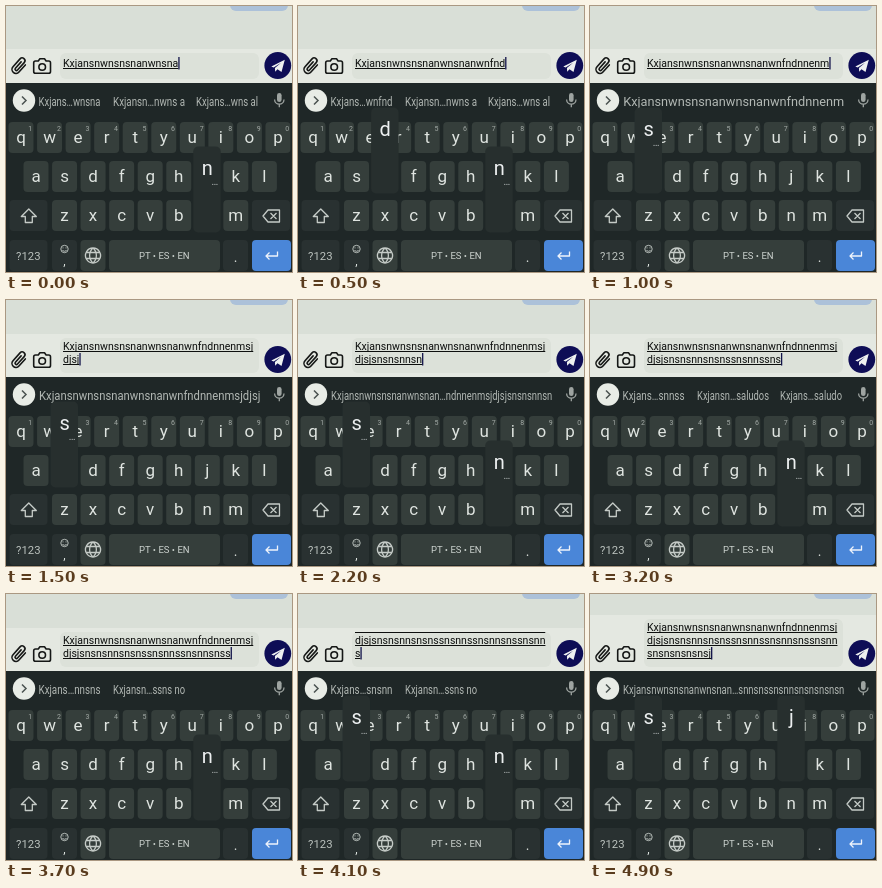
An HTML page that plays this animation: 286x266 px, repeating every 5000 ms.

```html
<!DOCTYPE html>
<html lang="en">
<head>
<meta charset="utf-8">
<title>Typing on a phone keyboard</title>
<style>
  html, body { margin: 0; width: 100%; height: 100%; overflow: hidden; background: #d9dfd7; }
  svg { display: block; width: 286px; height: 266px; font-family: Roboto, "Liberation Sans", sans-serif; }
</style>
</head>
<body>
<svg id="stage" viewBox="0 0 286 266" xmlns="http://www.w3.org/2000/svg">
  <defs><clipPath id="field"><rect id="fieldBox" x="50" width="205" height="70"/></clipPath></defs>
  <rect width="286" height="80" fill="#d9dfd7"/>
  <rect x="224" y="-12" width="58" height="17" rx="6" fill="#acc1d9"/>
  <rect id="panel" width="286" fill="#e4e8e1"/>
  <rect id="inputBox" x="54" width="199" rx="6" fill="#dce1d9"/>

  <g fill="none" stroke="#151716" stroke-width="1.6" stroke-linecap="round" stroke-linejoin="round">
    <path transform="translate(13 60) rotate(42)" d="M4-5V4.5a4 4 0 0 1-8 0V-6a2.8 2.8 0 0 1 5.6 0V4a1.4 1.4 0 0 1-2.8 0V-4.5"/>
    <path d="M29.5 55h2.8l1.6-2.2h4.6l1.6 2.2h2.6q1.8 0 1.8 1.8v8.6q0 1.8-1.8 1.8H29.5q-1.8 0-1.8-1.8v-8.6q0-1.8 1.8-1.8z"/>
    <circle cx="36.2" cy="61" r="3.3"/>
  </g>
  <circle cx="271.8" cy="59.5" r="13.4" fill="#0e0d56"/>
  <path d="M265.3 60.5l13.5-6.7-3.3 12.2-4-2.7-2.3 2.5-.3-3.9 6.2-5.1-7.5 4.8z" fill="#eef0f0"/>

  <g clip-path="url(#field)">
    <g id="typed" font-size="10.5" fill="#0d0f0e"></g>
    <rect id="caret" width="1.3" height="12.5" fill="#12134a"/>
  </g>

  <rect y="77" width="286" height="189" fill="#1f2727"/>
  <circle cx="18" cy="94.5" r="11.2" fill="#e8ece6"/>
  <path d="M16 90.5l4 4-4 4" fill="none" stroke="#4a5250" stroke-width="1.5"/>
  <g fill="none" stroke="#9ea4a1" stroke-width="1.3">
    <rect x="271" y="87" width="4.6" height="9" rx="2.3" fill="#9ea4a1" stroke="none"/>
    <path d="M268.6 93.5a4.7 4.7 0 0 0 9.4 0M273.3 98.3v3"/>
  </g>
  <g id="hints" font-size="12.74" fill="#b2b8b4" text-anchor="middle"></g>
  <g id="keys" text-anchor="middle"></g>
  <g id="popups" text-anchor="middle"></g>
</svg>
<script>
const $ = id => document.getElementById(id);
const PITCH = 28.55, LINE = 13, LEFT = 57;
const LINES = [
  "Kxjansnwnsnsnanwnsnanwnfndnnenmsj",
  "djsjsnsnsnnsnsnssnsnnssnsnnsnssnsnn",
  "snsnsnsnsnsjs"
];
const TEXT = LINES.join("");
// [time, characters typed]; the fraction is progress towards the next key
const PACE = [[0, 20.5], [1000, 31.7], [1500, 37.6], [2200, 46.2],
              [3200, 58.6], [4100, 69.2], [4900, 80.2], [5000, 80.9]];
// Suggestion strip states: start, prediction lag, side suggestions
const STRIP = [
  { from: 0, lag: 0, side: ["Kxjansn…nwns a", "Kxjans…wns al"] },
  { from: 600, lag: 0 },
  { from: 2800, lag: 2, side: ["Kxjansn…saludos", "Kxjans…saludo"] },
  { from: 3700, lag: 1, side: ["Kxjansn…ssns no"] },
  { from: 4200, lag: 2 }
];
const MIN_SCALE = 0.73, HINT_SIZE = 12.74;

const pen = document.createElement("canvas").getContext("2d");
function measure(text, size) {
  pen.font = "100px Roboto, 'Liberation Sans', sans-serif";
  return pen.measureText(text).width * size / 100;
}

function add(parent, tag, attrs, text) {
  const node = document.createElementNS("http://www.w3.org/2000/svg", tag);
  for (const name in attrs) node.setAttribute(name, attrs[name]);
  if (text !== undefined) node.textContent = text;
  parent.appendChild(node);
  return node;
}
function set(id, attrs) {
  for (const name in attrs) $(id).setAttribute(name, attrs[name]);
}

const keyAt = {};
function drawKey(x, y, width, fill) {
  add($("keys"), "rect", { x: x - width / 2, y: y - 15.5, width, height: 31, rx: 4, fill });
}
function drawLabel(text, x, y, size, fill = "#dfe4e0") {
  add($("keys"), "text", { x, y, "font-size": size, fill }, text);
}
function drawRow(letters, x0, y, numbered) {
  [...letters].forEach((ch, i) => {
    const x = x0 + i * PITCH;
    keyAt[ch] = { x, y };
    drawKey(x, y, 25, "#353e3b");
    drawLabel(ch, x, y + 5.5, 17);
    if (numbered) drawLabel((i + 1) % 10, x + 9.3, y - 6.5, 7, "#a3aaa6");
  });
}
function drawKeyboard() {
  const keys = $("keys"), dark = "#293131", light = "#353e3b";
  drawRow("qwertyuiop", 15, 131.5, true);
  drawRow("asdfghjkl", 30, 170.5);
  drawRow("zxcvbnm", 58.5, 209.5);
  drawKey(22.5, 209.5, 38, dark);
  drawKey(265, 209.5, 38, dark);
  drawKey(22.5, 249.5, 38, dark);
  drawKey(58.5, 249.5, 25, dark);
  drawKey(87, 249.5, 25, light);
  drawKey(158.5, 249.5, 111, light);
  drawKey(229.5, 249.5, 25, dark);
  drawKey(265.5, 249.5, 39, "#4a86d8");
  drawLabel("?123", 22.3, 253.5, 11.3, "#bcc3bf");
  drawLabel(",", 58.5, 259, 12);
  drawLabel("PT • ES • EN", 158.3, 253, 9.5, "#ced4d0");
  drawLabel(".", 229.5, 256, 14);

  const icons = add(keys, "g", { fill: "none", stroke: "#c5cbc7", "stroke-width": 1.3, "stroke-linejoin": "round" });
  const icon = d => add(icons, "path", { d });
  icon("M22.8 203l7.5 7.5h-4v6h-7v-6h-4z");
  icon("M262 204h11.5v12H262l-5-6zM264.5 207l6 6M270.5 207l-6 6");
  icon("M87 242a7.5 7.5 0 1 0 .01 0zM87 242c-4.5 4-4.5 11 0 15c4.5-4 4.5-11 0-15M80.5 246.5h13M80.5 252.5h13");
  add(icons, "circle", { cx: 58.5, cy: 243, r: 3.7, "stroke-width": 0.9 });
  add(icons, "path", { d: "M56.5 244a2.2 2.2 0 0 0 4 0M57 241.4v1M60 241.4v1", "stroke-width": 0.9 });
  add(icons, "path", { d: "M271.5 245.5v4.5H260M263.5 246.5l-3.5 3.5 3.5 3.5", stroke: "#eef3fb" });
}

function typedAt(t) {
  const i = PACE.findIndex(p => p[0] > t);
  const [t0, n0] = PACE[i - 1], [t1, n1] = PACE[i];
  return n0 + (n1 - n0) * (t - t0) / (t1 - t0);
}

function drawField(count) {
  const shown = [];
  let rest = count;
  for (const line of LINES) {
    if (rest > 0) shown.push(line.slice(0, rest));
    rest -= line.length;
  }
  // The box grows one step after a wrap; until then it scrolls.
  const last = shown.length - 1;
  const wrapped = last > 0 && shown[last].length === 1;
  const rows = shown.length - (wrapped ? 1 : 0);
  const base = rows === 1 ? 61 : 63;
  const panelTop = rows === 1 ? 43 : 60 - LINE * rows;
  set("panel", { y: panelTop, height: 78 - panelTop });
  set("inputBox", { y: panelTop + 4, height: 69 - panelTop });
  set("fieldBox", { y: base - LINE * rows + 1 });

  const box = $("typed");
  box.replaceChildren();
  shown.forEach((line, i) => {
    const y = base - (last - i) * LINE;
    add(box, "text", { x: LEFT, y }, line);
    add(box, "rect", { x: LEFT, y: y + 1, width: measure(line, 10.5), height: 1 });
  });
  set("caret", { x: LEFT + measure(shown[last], 10.5), y: base - 10 });
}

// Squeeze to the minimum scale, then cut out the middle.
function shorten(text, width) {
  const room = width / MIN_SCALE;
  if (measure(text, HINT_SIZE) <= room) return text;
  const half = (room - measure("…", HINT_SIZE)) / 2;
  let head = text.length, tail = 0;
  while (measure(text.slice(0, head), HINT_SIZE) > half) head--;
  while (measure(text.slice(tail), HINT_SIZE) > half) tail++;
  return text.slice(0, head) + "…" + text.slice(tail);
}
function drawHint(label, x, width) {
  const scale = Math.min(1, width / measure(label, HINT_SIZE));
  add($("hints"), "text", { transform: `translate(${x} 99.5) scale(${scale} 1)` }, label);
}
function drawStrip(t, count) {
  const state = STRIP.filter(s => s.from <= t).pop();
  const word = TEXT.slice(0, count - state.lag);
  $("hints").replaceChildren();
  if (state.side) {
    drawHint(shorten(word, 63), 63.5, 62);
    drawHint(state.side[0], 143, 72);
    if (state.side[1]) drawHint(state.side[1], 221, 62);
  } else {
    drawHint(shorten(word, 221.5), 143.7, 221.5);
  }
}

function drawPopup(ch) {
  const { x, y } = keyAt[ch.toLowerCase()], box = $("popups");
  add(box, "rect", { x: x - 14, y: y - 69, width: 27.5, height: 86, rx: 5, fill: "#272f2e" });
  add(box, "text", { x, y: y - 40.5, "font-size": 20, fill: "#eceff0" }, ch);
  if ("aensc".includes(ch)) add(box, "text", { x: x + 7.5, y: y - 31, "font-size": 10, fill: "#c4c9c9" }, "…");
}

function render(time) {
  const t = Math.floor(time % 5000 / 100) * 100;
  const progress = typedAt(t), count = Math.floor(progress);
  drawField(count);
  drawStrip(t, count);
  $("popups").replaceChildren();
  const next = TEXT[count], prev = TEXT[count - 1];
  if (progress - count < 0.4 && prev !== next) drawPopup(prev);
  drawPopup(next);
}

drawKeyboard();
const start = performance.now();
function tick() {
  render(performance.now() - start);
  requestAnimationFrame(tick);
}
tick();
</script>
</body>
</html>
```
